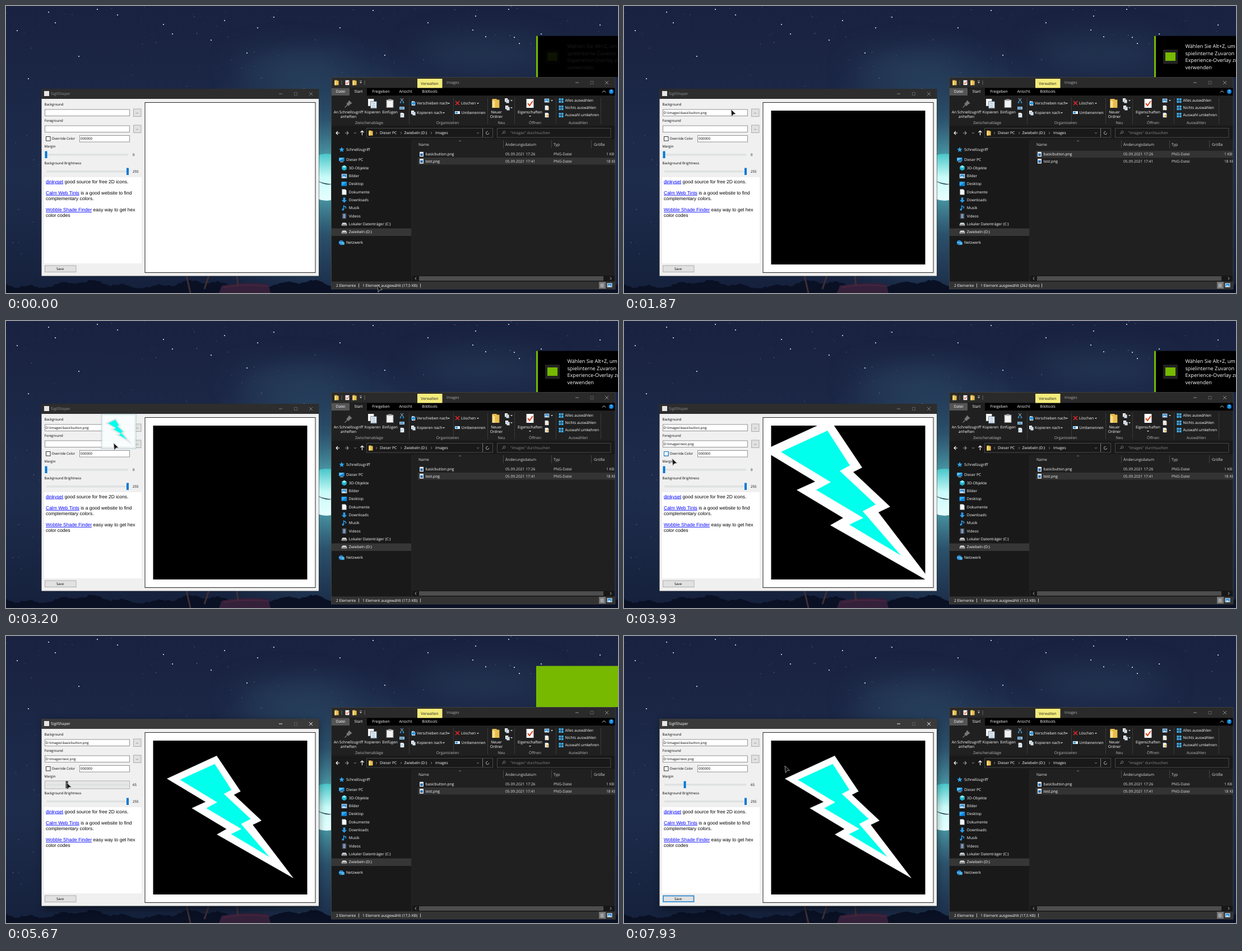
Write an HTML page that moves like this. It is 1092x513 px and loops after 8000 ms.

```html
<!DOCTYPE html>
<html lang="de">
<head>
<meta charset="utf-8">
<title>Desktop</title>
<style>
html, body { margin: 0; width: 100%; height: 100%; overflow: hidden; background: #1a2341; }
svg { display: block; width: 100vw; height: 100vh; font: 6.75px "Open Sans", "Noto Sans", sans-serif; text-rendering: geometricPrecision; }
.form { font-size: 6.1px; fill: #000; }
.dlg { font-size: 6.5px; fill: #000; }
.html { font: 8.5px "Liberation Sans", Arial, sans-serif; fill: #000; }
.link { fill: #00f; text-decoration: underline; }
.toast { font-size: 9.1px; fill: #fff; }
.mid { text-anchor: middle; }
.end { text-anchor: end; }
.dim { fill: #9a9a9a; }
.soft { filter: blur(26px); }
</style>
</head>
<body>
<svg id="stage" viewBox="0 0 1092 513" preserveAspectRatio="none"></svg>
<script>
const LOOP = 8000;
const BURSTS = [[70, 800, 12], [930, 1670, 12], [1870, 2530, 11], [2670, 3400, 11], [3600, 4400, 13],
  [4470, 5200, 11], [5530, 6330, 13], [6400, 7200, 13], [7270, 7930, 11]];

// Markup helpers; text is placed by its vertical centre.
const rect = (x, y, w, h, fill, more = '') => `<rect x="${x}" y="${y}" width="${w}" height="${h}" fill="${fill}" ${more}/>`;
const box = (x, y, w, h, fill, line, more = '') => rect(x + .5, y + .5, w - 1, h - 1, fill, `stroke="${line}" ${more}`);
const text = (x, y, s, more = 'fill="#fff"') => `<text x="${x}" y="${y + 2.4}" ${more}>${s}</text>`;
const fill = (d, color, more = '') => `<path d="${d}" fill="${color}" ${more}/>`;
const line = (d, color, w = 1, more = '') => `<path d="${d}" fill="none" stroke="${color}" stroke-width="${w}" ${more}/>`;
const dot = (x, y, r, color, more = '') => `<circle cx="${x}" cy="${y}" r="${r}" fill="${color}" ${more}/>`;
const group = (id, inner, more = '') => `<g id="${id}" ${more}>${inner}</g>`;
const at = (x, y, k, inner) => `<g transform="translate(${x} ${y}) scale(${k})">${inner}</g>`;

// Icons, centred on the origin in a box of about 10 units.
const icons = {
  folder: fill('M-4-5H1V-4H4V5H-4Z', '#e9bd4c') + fill('M-4-4L-1-2V5H-4Z', '#ffe08a'),
  page: fill('M-4-5H2L4-3V5H-4Z', '#f4f6f8', 'stroke="#a9b4bd" stroke-width=".6"'),
  image: rect(-4, -5, 8, 10, '#f6f6f6') + rect(-2.8, -2, 5.6, 5, '#2f86d6') + fill('M-2.8 3L0 0L2.8 3Z', '#1d4d80'),
  star: fill('M0-5L1.4-1.6 5-1.4 2.2 1 3.2 4.8 0 2.6-3.2 4.8-2.2 1-5-1.4-1.4-1.6Z', '#2ea5ee'),
  screen: rect(-5, -4, 10, 6.5, '#1b87d8') + fill('M-5-4H5L-5 2Z', '#55c2f5') + rect(-3, 3.2, 6, 1.2, '#b9c6d0'),
  cube: fill('M0-5L4.5-2.5V2.5L0 5L-4.5 2.5V-2.5Z', '#20b4cf') + fill('M0-5L4.5-2.5L0 0L-4.5-2.5Z', '#8ceaf5'),
  photo: rect(-5, -4, 10, 8, '#e4eef5') + rect(-4, -3, 8, 6, '#3d94d8') + fill('M-4 3L-1 0L4 3Z', '#d8eefa'),
  desk: rect(-5, -4, 10, 8, '#0b84de') + fill('M-5-4H5L-5 4Z', '#31a8f5'),
  down: fill('M-2-5H2V0H5L0 5L-5 0H-2Z', '#2b9be8'),
  note: line('M-1 3V-4L3-2V1', '#2b9be8', 1.6) + dot(-2.4, 3, 2, '#2b9be8'),
  film: rect(-4, -5, 8, 10, '#4a4f5a') + rect(-2, -4, 4, 8, '#7e9cc0'),
  drive: fill('M-5 0L-3-3H3L5 0V3H-5Z', '#c9cdd0') + rect(-4, 1, 8, 1, '#444'),
  net: dot(-1, 0, 4.5, '#2789cf') + line('M-5-1Q0 2 3-2', '#9fdcff') + rect(0, -1, 5, 5, '#4db7ee'),
  clip: rect(-4, -4, 8, 9, '#f2f2f2', 'stroke="#888" stroke-width=".7"') + rect(-2, -5, 4, 2, '#9da5ab'),
  copy: rect(-5, -5, 6.5, 8, '#f2f4f6') + rect(-2, -2, 6.5, 7.5, '#f2f4f6', 'stroke="#66798a" stroke-width=".6"') + line('M-.5 0H3M-.5 2H3M-.5 4H3', '#6c9cc6', .6),
  check: rect(-4, -5, 8, 10, '#fff') + line('M-2.5 0L-.5 2.5L3-2.5', '#e2451e', 1.3),
  grid: rect(-4.5, -4.5, 4, 4, '#3fb0f5') + rect(.5, -4.5, 4, 4, '#3fb0f5') + rect(-4.5, .5, 4, 4, '#3fb0f5') + rect(.5, .5, 4, 4, '#3fb0f5'),
  pin: fill('M1-5L5-1L2 1L0 3L-3 0L-1-2Z', '#777') + line('M-1 1L-5 5', '#777'),
  user: fill('M-5-5H2V5H-5Z', '#f5cf68') + dot(1.5, -1, 2, '#a8744f') + fill('M-2 5Q1.5-1 5 5Z', '#3f8d63'),
  open: fill('M-4-5H3V5H-4Z', '#f7d67b') + fill('M-1-4H4V4L-1 5Z', '#fdf4d7')
};
const icon = (name, x, y, k = 1) => at(x, y, k, icons[name]);

function sky() {
  let seed = 7;
  const rnd = () => (seed = seed * 16807 % 2147483647) / 2147483647;
  let stars = '';
  for (let i = 0; i < 330; i++) {
    const y = rnd() ** 1.4 * 470;
    stars += dot((rnd() * 1092).toFixed(1), y.toFixed(1), (.25 + rnd() * .4).toFixed(2), '#c4d9ef', `opacity="${(.25 + rnd() * .5).toFixed(2)}"`);
  }
  const bright = [76, 11, 88, 30, 163, 6, 199, 16, 478, 20, 390, 26, 366, 61, 596, 39, 655, 8, 676, 88, 753, 30, 833, 43,
    838, 18, 856, 55, 897, 6, 907, 56, 916, 67, 955, 50, 1060, 34, 430, 84, 281, 33, 297, 50, 20, 44, 449, 39, 130, 90, 40, 130];
  for (let i = 0; i < bright.length; i += 2) stars += dot(bright[i], bright[i + 1], 1, '#eef7ff');
  let trees = 'M0 513';
  for (let x = 0; x <= 1092; x += 4) trees += `L${x} ${(496 + 5 * Math.sin(x / 31) + 3 * Math.sin(x / 9) + rnd() * 3).toFixed(1)}`;
  return `<defs>
    <linearGradient id="night" x2="0" y2="1"><stop stop-color="#192240"/><stop offset=".6" stop-color="#1e2c4c"/><stop offset="1" stop-color="#15213c"/></linearGradient>
    <radialGradient id="glow" gradientUnits="userSpaceOnUse" cx="575" cy="305" r="260"><stop offset=".1" stop-color="#4fa6b0"/><stop offset=".4" stop-color="#315f78" stop-opacity=".75"/><stop offset="1" stop-color="#27415f" stop-opacity="0"/></radialGradient>
    <linearGradient id="moon" x2="0" y2="1"><stop stop-color="#48c6c9"/><stop offset=".5" stop-color="#c9fbf8"/><stop offset="1" stop-color="#e6ffff"/></linearGradient>
    <linearGradient id="place" x2="0" y2="1"><stop stop-color="#bdbdbd"/><stop offset="1" stop-color="#e2e2e2"/></linearGradient>
    <clipPath id="pane">${rect(580, 127, 507, 379, '#000')}</clipPath></defs>`
    + rect(0, 0, 1092, 513, 'url(#night)') + rect(300, 40, 560, 473, 'url(#glow)')
    + '<g class="soft" fill="#31506a"><ellipse cx="850" cy="85" rx="120" ry="26" opacity=".4"/><ellipse cx="510" cy="110" rx="100" ry="24" opacity=".5"/></g>'
    + stars + dot(572, 306, 42, 'url(#moon)') + fill('M555 312Q570 319 584 318Q570 322 555 312Z', '#12303f')
    + fill(trees + 'V513Z', '#0a1125') + fill('M385 500Q430 492 468 497L472 513H380Z', '#35203a')
    + line('M388 503Q430 496 468 501', '#5b2a42') + line('M322 482L329 513M362 482L354 506M412 482L414 500', '#3f2f35', 3);
}

const winButtons = (x, y, gap, color) => line(`M${x} ${y}h6M${x + 2 * gap} ${y - 3}l6 6m0-6l-6 6`, color, .9)
  + box(x + gap, y - 3, 6, 6, 'none', '#5a5a5a');

function creator() {
  const field = (x, y, w) => box(x, y, w, 12.5, '#fff', '#7a7a7a', 'stroke-width=".8"');
  const browse = y => box(227, y, 14.5, 14.5, '#e1e1e1', '#adadad') + text(234, y + 6, '...', 'class="mid"');
  const track = y => rect(72, y, 146, 3.5, '#dfe2e2');
  return group('glowShadow', rect(66, 152, 492, 336, '#000', 'opacity=".45" style="filter:blur(7px)"'))
    + rect(63, 148, 495.5, 335, '#2d2d2d') + group('titleBar', rect(63, 148, 495.5, 18, '#3a3a3a'))
    + rect(68, 152, 9, 9, '#e6e6e6')
    + group('idleTitle', text(80, 157, 'SigilShaper', 'fill="#8e8e8e"') + winButtons(487, 157, 27, '#8a8a8a'))
    + group('liveTitle', text(80, 157, 'SigilShaper') + winButtons(487, 157, 27, '#fff'))
    + rect(63.5, 166, 494.5, 316.5, '#f0f0f0')
    + '<g class="form">'
    + text(68.5, 176, 'Background', '') + field(69, 184.5, 152) + browse(183.5)
    + text(68.5, 205, 'Foreground', '') + field(69, 213.5, 152) + browse(212.5)
    + group('backPath', text(70.5, 190.5, 'D:\\Images\\basicbutton.png', '')) + group('frontPath', text(70.5, 219.5, 'D:\\Images\\test.png', ''))
    + box(71, 233, 8.5, 8.5, '#fff', '#333') + group('checkHover', box(71, 233, 8.5, 8.5, '#fff', '#0078d7'))
    + text(81.5, 237, 'Override Color', '') + field(131, 231, 90) + text(133, 237, '000000', '')
    + text(68.5, 251, 'Margin', '') + group('focusBox', box(69, 258.5, 152, 15, '#e8e8e8', '#a0a0a0', 'stroke-width=".8"')) + track(264)
    + '<rect id="thumb" y="259.5" width="4" height="12.5"/>' + '<text id="margin" x="226" y="268.4">0</text>'
    + text(68.5, 281, 'Background Brightness', '') + track(294) + rect(215, 289.5, 4, 12.5, '#0078d7') + text(226, 295.5, '255', '')
    + '</g>' + rect(68, 306, 174, 154, '#fff') + '<g class="html">'
    + text(71, 314.2, '<tspan class="link">dinkyset</tspan> good source for free 2D icons.', '')
    + text(71, 334.4, '<tspan class="link">Calm Web Tints</tspan> is a good website to find', '') + text(71, 344.5, 'complementary colors.', '')
    + text(71, 364.6, '<tspan class="link">Wobble Shade Finder</tspan> easy way to get hex', '') + text(71, 374.7, 'color codes', '')
    + '</g>' + box(69, 463.5, 56.5, 12.5, '#e1e1e1', '#adadad')
    + group('saveHover', box(69, 463.5, 56.5, 12.5, '#e5f1fb', '#0078d7')) + group('saveFocus', box(69.5, 464, 55.5, 11.5, '#e1e1e1', '#3c94d8', 'stroke-width="1.8"'))
    + text(96.5, 469.5, 'Save', 'class="form mid"') + box(247.5, 172, 305, 305, '#fff', '#222')
    + group('button', rect(262.5, 187, 275, 275, '#000')) + group('bolt', boltShape('#fff'));
}

function boltShape(rim) {
  return fill('M248.5 231.3L367.8 176.4L425 262L409 270L475 332L454 342L551.5 470L368 365L391 352L308 302L341 287Z', rim)
    + fill('M280 234L363 196L403 258L385 268L449 328L426 340L494 419L402 364L427 352L343 302L369 288Z', '#00ffec');
}

function explorer() {
  const label = (x, y, s) => text(x, y, s, 'class="mid" fill="#fff"');
  const caption = (x, s) => text(x, 209, s, 'class="mid" fill="#b8b8b8"');
  const arrow = (x, y) => fill(`M${x} ${y - 1}h4l-2 2.2Z`, '#ccc');
  const nav = [['star', 'Schnellzugriff', 0, 256.5], ['screen', 'Dieser PC', 0, 275], ['cube', '3D-Objekte', 1, 289.5], ['photo', 'Bilder', 1, 304],
    ['desk', 'Desktop', 1, 318], ['page', 'Dokumente', 1, 332.5], ['down', 'Downloads', 1, 347], ['note', 'Musik', 1, 361], ['film', 'Videos', 1, 375.5],
    ['drive', 'Lokaler Datenträger (C:)', 1, 390], ['drive', 'Zwiebeln (D:)', 1, 404], ['net', 'Netzwerk', 0, 423]];
  const file = (y, name, time, size) => icon('image', 741.5, y, .85) + text(748.5, y, name) + text(891, y, time, 'fill="#ddd"')
    + text(977, y, 'PNG-Datei', 'fill="#ddd"') + text(1071, y, size, 'fill="#ddd"');
  return '<g clip-path="url(#pane)">' + rect(580, 127, 507, 379, '#202020') + rect(580, 127, 507, 19.5, '#2a2a2a') + rect(580, 146.5, 507, 13.5, '#000')
    + icon('folder', 590, 137, .9) + icon('check', 609, 137, .85) + icon('folder', 622, 137, .9) + line('M599 133v8M640 133v8', '#777', .8) + arrow(631, 137) + line('M631 134h4', '#ccc', .8)
    + rect(734, 130, 44.5, 16.5, '#f3ec7c') + text(756, 138.5, 'Verwalten', 'class="mid" fill="#222"') + text(786, 137, 'Images', 'fill="#aaa"')
    + winButtons(1016, 137, 26.5, '#999')
    + rect(580, 146.5, 33, 13.5, '#555') + rect(613, 146.5, 31, 13.5, '#202020')
    + label(597, 153, 'Datei') + label(629, 153, 'Start') + label(669, 153, 'Freigeben') + label(713, 153, 'Ansicht') + label(756, 153, 'Bildtools')
    + line('M1064 154.5l3-3l3 3', '#ddd') + dot(1080, 153, 4, '#0b84dc') + text(1080, 153, '?', 'class="mid" fill="#fff"')
    + line('M719.5 164v47M798.5 164v47M859.5 164v47M907.5 164v47M981.5 164v47M1061.5 164v47', '#3a3a3a')
    + icon('pin', 611, 175, 1.3) + label(611, 189.5, 'An Schnellzugriff') + label(611, 197.5, 'anheften')
    + icon('copy', 654, 174, 1.6) + label(654, 189.5, 'Kopieren') + icon('clip', 685, 174, 1.5) + label(685, 189.5, 'Einfügen')
    + line('M704 165l5 6M709 165l-5 6', '#9ecbea') + dot(704, 172.5, 1.3, '#2b9be8') + dot(709, 172.5, 1.3, '#2b9be8')
    + rect(702, 180, 9, 5, '#8fc4e8') + line('M703 182.5h6', '#235', .8) + icon('page', 707, 195, .8) + line('M705 196l3-2', '#2b9be8')
    + icon('page', 727, 174, .75) + fill('M723 172h4v-2l4 4l-4 4v-2h-4Z', '#2b9be8') + text(733, 174, 'Verschieben nach') + arrow(788, 174)
    + icon('copy', 727, 191, .8) + text(733, 191, 'Kopieren nach') + arrow(779, 191)
    + line('M802 170l7 7m0-7l-7 7', '#e32626', 1.7) + text(812, 174, 'Löschen') + arrow(840, 174)
    + rect(801, 188, 9, 5, '#e8f2fa') + rect(802, 189, 4, 3, '#2b9be8') + text(812.5, 191, 'Umbenennen')
    + icon('folder', 874, 174, 1.6) + label(875, 189.5, 'Neuer') + label(875, 197.5, 'Ordner') + icon('copy', 894, 169, .8) + icon('copy', 895, 182, .8) + arrow(900, 169) + arrow(900, 182)
    + icon('check', 935, 174, 1.6) + label(935, 189.5, 'Eigenschaften') + arrow(933, 197)
    + icon('photo', 965, 169, .85) + arrow(972, 169) + icon('page', 965, 182, .8) + icon('page', 965, 195, .8) + line('M964 185l4-5', '#e5b84a') + dot(966, 196, 2, '#e5b84a')
    + icon('grid', 990.5, 169, .9) + icon('grid', 990.5, 182, .9) + icon('grid', 990.5, 195, .9)
    + text(997.5, 169, 'Alles auswählen') + text(997.5, 182, 'Nichts auswählen') + text(997.5, 195, 'Auswahl umkehren')
    + caption(648, 'Zwischenablage') + caption(788, 'Organisieren') + caption(884, 'Neu') + caption(944, 'Öffnen') + caption(1021, 'Auswählen')
    + rect(580, 214, 507, 279, '#191919') + rect(725, 238, 362, 244, '#202020')
    + line('M595 227h-6m3-3l-3 3l3 3M635.500 231v-8m-3 3l3-3l3 3', '#fff', 1.1) + line('M605 227h6m-3-3l3 3l-3 3', '#999', 1.1) + line('M621 226l2 2l2-2', '#999', .9)
    + box(643, 218, 226, 17.5, '#191919', '#484848') + icon('folder', 651, 227, .9) + line('M660 225l2 2l-2 2M704 225l2 2l-2 2M758 225l2 2l-2 2M840 226l2 2l2-2M850.500 219v15', '#999', .8)
    + text(667, 227, 'Dieser PC') + text(710.5, 227, 'Zwiebeln (D:)') + text(766, 227, 'Images')
    + `<circle cx="859" cy="227" r="2.6" fill="none" stroke="#aaa" stroke-dasharray="13 4"/>`
    + box(876, 218, 203.5, 17.5, '#191919', '#484848') + line('M885 229l3-3', '#888') + `<circle cx="889" cy="225.500" r="2" fill="none" stroke="#888" stroke-width=".8"/>`
    + text(900, 227, '"Images" durchsuchen', 'fill="#8a8a8a"')
    + rect(581, 397.5, 142, 13.5, '#363636') + line('M724 240v252', '#2c2c2c')
    + nav.map(([kind, name, deep, y]) => icon(kind, 599 + deep * 4.5, y, .95) + text(607 + deep * 4.8, y, name)).join('')
    + line('M887.500 240v14M973.500 240v14M1044.500 240v14', '#444') + line('M808 242l2-1.500l2 1.500', '#999', .8)
    + text(736, 247.5, 'Name', 'fill="#ddd"') + text(891, 247.5, 'Änderungsdatum', 'fill="#ddd"') + text(977, 247.5, 'Typ', 'fill="#ddd"') + text(1049, 247.5, 'Größe', 'fill="#ddd"')
    + '<rect id="hotRow" x="735" width="352" height="12.5"/><rect id="pickedRow" x="735" width="352" height="12.5"/>'
    + file(265, 'basicbutton.png', '05.09.2021 17:26', '1 KB') + file(277.3, 'test.png', '05.09.2021 17:41', '18 KB')
    + rect(725, 482, 362, 10, '#171717') + rect(737, 483, 329, 8, '#4d4d4d') + line('M732 484.500l-2 2.500l2 2.500M1078 484.500l2 2.500l-2 2.500', '#aaa')
    + rect(580, 492.5, 507, 13.5, '#333') + text(589, 499.5, '2 Elemente') + line('M629.500 496v7', '#ddd', .8)
    + '<text id="status" x="636" y="501.900" fill="#fff"/><path id="bar" d="M0 496v7" stroke="#ddd" stroke-width=".8"/>'
    + rect(1058, 493, 12, 12.5, '#777') + line('M1062 496v7M1065 496v7', '#eee') + icon('photo', 1077, 499, .9)
    + '</g>' + `<rect x="580.500" y="127.500" width="506.500" height="378.500" fill="none" stroke="#3f3f3f"/>`;
}

function toast() {
  const rows = ['Wählen Sie Alt+Z, um', 'spielinterne Zuvaron', 'Experience-Overlay zu', 'verwenden'];
  return group('toast', rect(946, 53.5, 146, 73.5, '#000')
    + group('toastBody', rect(962, 78, 26, 25.5, '#222') + rect(966, 83, 18, 15, '#76b900')
      + rows.map((s, i) => text(1001.5, 72.7 + i * 12.5, s, 'class="toast"')).join('')))
    + '<rect id="green" y="53.500" height="73.500" fill="#76b900"/>';
}

function dialog() {
  const places = [['star', 'Schnellzugriff', 71], ['desk', 'Desktop', 107], ['folder', 'Bibliotheken', 143], ['screen', 'Dieser PC', 178], ['net', 'Netzwerk', 213]];
  const files = [['user', 'Lulu Hoho'], ['folder', 'Bibliotheken'], ['open', 'Town.Van.Touring.v1.5.9.2'], ['open', 'FoxCounter'],
    ['screen', 'Dieser PC'], ['net', 'Netzwerk'], ['open', 'Programmieren'], ['open', 'Tools']];
  const combo = (y, back, edge) => box(124.5, y, 147, 13, back, edge) + line(`M264 ${y + 5}l2 2l2-2`, '#444', .9);
  const shortcut = (x, name, size) => text(x, 191, name, '') + text(x, 200, 'Verknüpfung', 'fill="#777"') + text(x, 209, size, 'fill="#777"');
  const link = x => rect(x, 206, 8, 8, '#fff', 'stroke="#aaa" stroke-width=".5"') + line(`M${x + 2} 212l4-4h-3m3 0v3`, '#1467c8');
  return group('dialog', rect(10, 22, 332, 248, '#000', 'opacity=".4" style="filter:blur(6px)"')
    + rect(8.5, 18, 331, 248, '#f0f0f0', 'stroke="#444" stroke-width=".8"') + rect(8.5, 18, 331, 18, '#292929')
    + text(13.5, 27, 'Save File') + line('M327 24l6 6m0-6l-6 6', '#fff', .9) + '<g class="dlg">'
    + text(63.5, 47, 'Speichern in:', 'class="end"') + box(68, 40.5, 155, 13.5, '#fff', '#7a7a7a') + icon('desk', 76, 47, .9) + text(83.5, 47, 'Desktop', '') + line('M215 46l2 2l2-2', '#444', .9)
    + dot(237, 47, 4.3, '#666') + line('M239.500 47h-5m2-2l-2 2l2 2', '#fff') + icon('page', 250, 47, .8) + line('M250 50v-5m-2 2l2-2l2 2', '#555') + icon('folder', 264, 47.5, .85) + dot(267, 44, 1.5, '#ef8a23')
    + rect(274, 43, 9, 8, '#1d74c4') + rect(275, 45, 7, 5, '#e5f2ff') + line('M278.500 45v5M275 47.500h7', '#1d74c4', .8) + fill('M284.500 46h4l-2 2.500Z', '#333')
    + rect(67, 58, 270, 165, '#fff') + box(13.5, 94, 50, 35.5, 'url(#place)', '#8a8a8a')
    + places.map(([kind, name, y]) => icon(kind, 38.5, y, 1.7) + text(38.5, y + 14.5, name, 'class="mid"')).join('')
    + files.map(([kind, name], i) => { const right = i > 3, y = 76 + i % 4 * 31; return icon(kind, right ? 218 : 86, y, 2.3) + text(right ? 236 : 103, y, name, ''); }).join('')
    + dot(86, 200, 8.5, '#000') + icon('open', 218, 200, 2.3) + dot(220, 200, 5, '#41464c') + dot(220, 200, 2, '#f0b060') + link(71) + link(204)
    + shortcut(103, 'All', '691 Bytes') + shortcut(236, 'PressGatewayMaterial', '993 Bytes')
    + text(69, 237.5, 'Dateiname:', '') + combo(231, '#fff', '#0078d7') + rect(127, 233, 17.5, 9, '#0078d7') + text(127.5, 237.5, '9.png')
    + text(69, 253.5, 'Dateityp:', '') + combo(247, '#e1e1e1', '#adadad') + text(127.5, 253.5, 'All Files (*.*)', '')
    + box(291, 231, 44.5, 13, '#e1e1e1', '#0078d7', 'stroke-width="1.4"') + text(313, 237.5, 'Speichern', 'class="mid"')
    + box(291, 247, 44.5, 13, '#e1e1e1', '#adadad') + text(313, 253.5, 'Abbrechen', 'class="mid"') + line('M333 264l4-4M335.500 264l1.500-1.500', '#aaa', .8) + '</g>');
}

const pointer = group('ghost', rect(-22, -52, 62, 62, '#e8f4f6', 'opacity=".8" stroke="#9fb6bd" stroke-width=".8"') + rect(-19, -49, 56, 56, '#fff', 'opacity=".75"')
    + group('ghostButton', rect(-16, -46, 49, 49, '#333437')) + group('ghostBolt', at(-55, -73, .16, boltShape('#e8e8e8'))))
  + group('denied', '<circle cx="21" cy="16" r="3.300" fill="#fff" stroke="#c9252b" stroke-width="1.200"/>' + line('M18.800 13.800l4.400 4.400', '#c9252b', 1.2))
  + fill('M0 0L1.200 12.500L4 8.800L8.400 8Z', '#161616', 'stroke="#b4b4b4" stroke-width=".8"');

stage.innerHTML = sky() + toast() + creator() + explorer() + dialog() + group('pointer', pointer);

const $ = id => document.getElementById(id);
const set = (id, attrs) => { for (const key in attrs) $(id).setAttribute(key, attrs[key]); };
const show = (id, on) => set(id, { visibility: on ? 'visible' : 'hidden' });
const within = (t, a, b) => t >= a && t < b;

// Rows of [time, value, ...], eased between neighbours.
const PATH = [[70, 663, 499], [600, 754, 269], [800, 750, 265], [930, 749, 265], [1200, 284, 224], [1470, 196, 188], [1670, 191, 185], [1870, 191, 185],
  [2400, 749, 276], [2530, 753, 275], [2670, 753, 275], [3200, 190, 218], [3400, 176, 214], [3600, 176, 214], [3930, 86, 246], [4250, 72, 263], [4470, 72, 264],
  [5130, 108, 262], [5670, 108, 262], [6270, 99, 468], [6600, 98, 468], [7130, 223, 262], [7200, 240, 255], [7270, 255, 250], [7530, 308, 237], [7680, 308, 237], [7930, 287, 232]];
const MARGIN = [[4470, 0], [5130, 65]];
const TOAST = [[0, .1], [500, 1]];
const GREEN_LEFT = [[5670, 946], [6060, 1092]];
const GREEN_RIGHT = [[5460, 949], [5663, 1092]];

function sample(track, t) {
  const next = track.findIndex(row => row[0] > t);
  if (next === 0) return track[0].slice(1);
  if (next < 0) return track[track.length - 1].slice(1);
  const a = track[next - 1], b = track[next], u = (t - a[0]) / (b[0] - a[0]), e = u * u * (3 - 2 * u);
  return a.slice(1).map((v, i) => v + (b[i + 1] - v) * e);
}

// The screen updates in bursts of even steps and rests in between.
function snap(t) {
  let rest = 0;
  for (const [a, b, n] of BURSTS) {
    if (t < a) return rest;
    const step = (b - a) / (n - 1);
    if (t < b) return a + Math.floor((t - a) / step + .1) * step;
    rest = b;
  }
  return rest;
}

function draw(now) {
  const t = snap(now);
  const [x, y] = sample(PATH, t);
  set('pointer', { transform: `translate(${x.toFixed(1)} ${y.toFixed(1)})` });
  const dragButton = within(t, 970, 1870), dragBolt = within(t, 2720, 3600);
  show('ghost', dragButton || dragBolt);
  set('ghostButton', { display: dragButton ? 'inline' : 'none' });
  set('ghostBolt', { display: dragBolt ? 'inline' : 'none' });
  show('denied', (dragButton || dragBolt) && within(x, 225, 560));

  const onButton = within(t, 660, 2660);
  const clicked = within(t, 660, 970) || within(t, 2660, 2740);
  set('pickedRow', { y: onButton ? 258.7 : 271, fill: clicked ? '#777' : '#333' });
  set('hotRow', { y: y < 271 ? 258.7 : 271, fill: '#4d4d4d' });
  show('hotRow', within(t, 560, 660) || within(t, 2400, 2660));
  $('status').textContent = `1 Element ausgewählt (${onButton ? '262 Bytes' : '17,5 KB'})`;
  set('bar', { transform: `translate(${onButton ? 745.5 : 739.5})` });

  show('backPath', t >= 1870);
  show('button', t >= 1870);
  show('frontPath', t >= 3600);
  show('bolt', t >= 3600);
  show('checkHover', within(t, 3850, 4050));
  const margin = Math.round(sample(MARGIN, t)[0]), scale = 1 - margin / 256;
  set('bolt', { transform: `translate(400 324.5) scale(${scale}) translate(-400 -324.5)` });
  set('thumb', { x: 69.5 + margin * .57, fill: within(t, 4470, 5790) ? '#333' : '#0078d7' });
  $('margin').textContent = margin;
  show('focusBox', within(t, 4470, 6400));

  const asking = within(t, 6590, 7660), active = t >= 4470 && !asking;
  show('dialog', asking);
  for (const id of ['glowShadow', 'titleBar', 'liveTitle']) show(id, active);
  show('idleTitle', !active);
  show('saveHover', within(t, 6190, 7660));
  show('saveFocus', t >= 7660);

  const left = sample(GREEN_LEFT, t)[0];
  show('toast', t < 5660);
  set('toastBody', { opacity: sample(TOAST, t)[0] });
  set('green', { x: left, width: Math.max(0, sample(GREEN_RIGHT, t)[0] - left) });
}

const start = performance.now();
function tick() {
  draw((performance.now() - start) % LOOP);
  requestAnimationFrame(tick);
}
tick();
</script>
</body>
</html>
```
